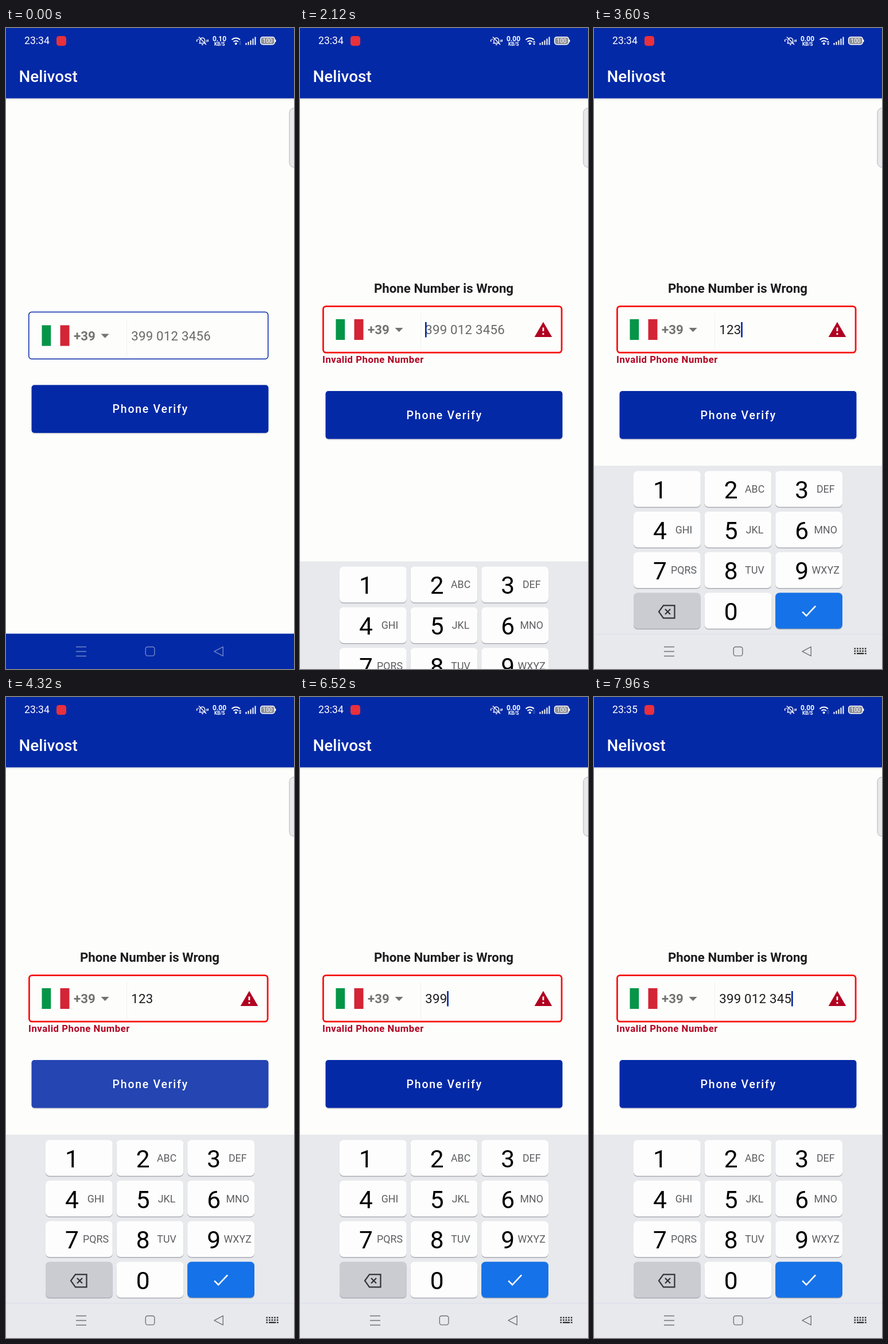
An HTML page that plays this animation: 502x1116 px, repeating every 8 s.

```html
<!DOCTYPE html>
<html lang="en">
<head>
<meta charset="utf-8">
<title>Phone verification</title>
<style>
  html, body { margin: 0; width: 100%; height: 100%; overflow: hidden; background: #fdfdfc; }
  svg { display: block; width: 502px; height: 1116px; font-family: Roboto, sans-serif; }
  .mid { text-anchor: middle; }
  .bold { font-weight: 700; }
  .medium { font-weight: 500; }
  .line { fill: none; stroke-width: 1.4; }
</style>
</head>
<body>
<svg viewBox="0 0 502 1116">
  <defs>
    <clipPath id="buttonClip"><rect x="44.5" y="621.5" width="413" height="83.5" rx="5"/></clipPath>
    <linearGradient id="shade" x2="0" y2="1">
      <stop stop-color="#000" stop-opacity=".12"/><stop offset="1" stop-color="#000" stop-opacity="0"/>
    </linearGradient>
    <g id="navIcons" class="line">
      <path d="M122 1077.5h18M122 1085.5h18M122 1093.5h18"/>
      <rect x="243.3" y="1077.5" width="15.6" height="15.6" rx="3.5"/>
      <path d="M363 1085.3L378.3 1077.3V1093.3Z" stroke-linejoin="round"/>
    </g>
  </defs>

  <rect width="502" height="1116" fill="#fdfdfc"/>
  <rect y="122.5" width="502" height="4" fill="url(#shade)"/>
  <rect width="502" height="122.5" fill="#0329a6"/>
  <text class="medium" x="22.5" y="93.5" font-size="27.9" fill="#fff">Nelivost</text>

  <g fill="#fff">
    <text id="clock" x="32" y="28.3" font-size="17.6"></text>
    <rect x="88" y="14" width="17" height="17" rx="4.5" fill="#e9303c"/>
    <path class="line" stroke="#fff" d="M336.5 26.5h11.500M338 26v-4.500a4.300 4.300 0 0 1 8.600 0V26M341 29h2.800M336 15.500L349 29M332.700 20v4M335 18.800v2M350 20.500v4M352.300 20v4"/>
    <text id="speed" class="mid bold" x="372" y="22.6" font-size="12"></text>
    <text class="mid bold" x="372.3" y="30.5" font-size="8.2">KB/S</text>
    <path d="M393.500 20.500a10 10 0 0 1 14.400 0M396.500 24a6 6 0 0 1 8.400 0" fill="none" stroke="#fff" stroke-width="2"/>
    <circle cx="400.7" cy="27.3" r="2"/>
    <path id="wifiArrows" d="M405.800 25.300l2.300-3 2.300 3zM405.800 26.800l2.300 3 2.300-3z"/>
    <path d="M418.500 29.500v-3.500M422.500 29.500v-5.500M426.500 29.500v-8M430.500 29.500v-11M434.500 29.500v-14" stroke="#fff" stroke-width="2"/>
    <rect x="443.7" y="15.7" width="24.6" height="13" rx="4" fill="#8d9098" stroke="#fff" stroke-width="1.5"/>
    <rect x="469" y="20" width="1.5" height="4.5" rx=".7"/>
    <text class="mid" x="456" y="25.8" font-size="10">100</text>
  </g>

  <rect x="494" y="139.5" width="20" height="103" rx="8" fill="#e8e9ea" stroke="#b3b5bf"/>

  <g id="errors">
    <text class="mid bold" x="250.5" y="461" font-size="22.3" fill="#1c1c1e">Phone Number is Wrong</text>
    <text class="bold" x="39" y="583" font-size="16.73" letter-spacing=".53" fill="#b00020">Invalid Phone Number</text>
    <path d="M424 511.700l15.300 26.300h-30.600z" fill="#b00020"/>
    <path d="M422.600 521.500h2.800v6.500h-2.800zM422.600 531h2.800v3h-2.800z" fill="#fff"/>
  </g>

  <g id="field">
    <rect id="border" rx="5" fill="none"/>
    <path d="M210.500 507v66" stroke="#f1f1f4"/>
    <path d="M62.500 517.500h16v36h-16z" fill="#059547"/>
    <path d="M78.500 517.500h16v36h-16z" fill="#fff"/>
    <path d="M94.500 517.500h16v36h-16z" fill="#d32536"/>
    <text class="bold" x="118" y="543.5" font-size="22.3" fill="#737370">+39</text>
    <path d="M165.500 532.500h14.200l-7.100 7.200z" fill="#74746f"/>
    <text id="number" x="218.2" y="543.5" font-size="22.3" letter-spacing=".2"></text>
    <rect id="cursor" y="522.5" width="2.7" height="26.5" fill="#0329a6"/>
  </g>

  <g id="button">
    <rect x="45" y="623.5" width="412" height="83.5" rx="5" fill="#000" opacity=".13"/>
    <rect x="44.5" y="621.5" width="413" height="83.5" rx="5" fill="#0329a6"/>
    <g clip-path="url(#buttonClip)"><circle id="ripple" cy="663.5" fill="#fff"/></g>
    <text class="mid medium" x="251.8" y="670.3" font-size="19.5" letter-spacing="1.74" fill="#fff">Phone Verify</text>
  </g>

  <rect y="1054.5" width="502" height="61.5" fill="#0329a6"/>
  <use href="#navIcons" stroke="#7389cb"/>

  <g id="keyboard">
    <rect y="762" width="502" height="354" fill="#e7e9ec"/>
    <g id="keys"></g>
    <path d="M0 1055.500h502" stroke="#d9deea"/>
    <use id="darkNav" href="#navIcons"/>
    <g id="imeIcon" fill="none" stroke-width="2.4">
      <path d="M453.500 1080.500h21M453.500 1084.700h21" stroke-dasharray="2.6 2"/>
      <path d="M453.500 1089h2.600M458 1089h12.500M472.200 1089h2.600"/>
    </g>
  </g>
</svg>

<script>
const LOOP = 8000, FOCUS = 2040, ERROR = 1360;
const el = id => document.getElementById(id);
const clamp = v => Math.max(0, Math.min(1, v));
const progress = (t, from, to) => clamp((t - from) / (to - from));
const easeOut = p => 1 - (1 - p) ** 3;
const set = (id, attrs) => {
  for (const name in attrs) el(id).setAttribute(name, attrs[name]);
};

const labels = ['', 'ABC', 'DEF', 'GHI', 'JKL', 'MNO', 'PQRS', 'TUV', 'WXYZ'];
const layout = '123456789<0>';
const keyColor = { '<': '#cbccd2', '>': '#1672e8' };
const fillOf = key => keyColor[key] || '#fdfdfd';

el('keys').innerHTML = [...layout].map((key, i) => {
  const x = 69 + i % 3 * 123.6, y = 771.2 + Math.floor(i / 3) * 70.7;
  const box = (dy, attrs) => `<rect x="${x}" y="${y + dy}" width="116.8" height="62.5" rx="7" ${attrs}/>`;
  const base = box(1.5, 'fill="#a9abb3"') + box(0, `id="key${i}" fill="${fillOf(key)}"`);
  if (key === '<') return base + `<path transform="translate(${x + 43} ${y + 21})" fill="none" stroke="#303236"
    stroke-width="2.2" d="M9 1H28.500V23H9L1 12ZM12 7.500l9 9m0-9l-9 9"/>`;
  if (key === '>') return base + `<path d="M${x + 47} ${y + 33}l7 7 16-17" fill="none" stroke="#fff" stroke-width="2.6"/>`;
  return base + `<text class="mid" x="${x + 46}" y="${y + 47.6}" font-size="42.5">${key}</text>
    <text class="mid" x="${x + 87.5}" y="${y + 37.6}" font-size="17.8" fill="#5d5e61">${labels[i] || ''}</text>`;
}).join('');

// Each press: touch time, key. The edit lands a moment after the touch.
const EDIT_DELAY = 80, HOLD = 120;
const presses = [
  [2880, '1'], [3160, '2'], [3440, '3'],
  [4800, '<'], [4920, '<'], [5040, '<'],
  [5400, '3'], [5720, '9'], [6040, '9'],
  [6600, '0'], [6840, '1'], [7040, '2'],
  [7360, '3'], [7600, '4'], [7840, '5']
];

const format = d => [d.slice(0, 3), d.slice(3, 6), d.slice(6)].filter(Boolean).join(' ');

function drawInput(t) {
  let digits = '', lastEdit = FOCUS, held = '';
  for (const [down, key] of presses) {
    if (t >= down && t < down + HOLD) held = key;
    if (t < down + EDIT_DELAY) continue;
    digits = key === '<' ? digits.slice(0, -1) : digits + key;
    lastEdit = down + EDIT_DELAY;
  }
  [...layout].forEach((key, i) => {
    const pressed = key === '<' ? '#b9bbc1' : '#e2e4e2';
    set('key' + i, { fill: key === held ? pressed : fillOf(key) });
  });
  const number = el('number');
  number.textContent = digits ? format(digits) : '399 012 3456';
  set('number', { fill: digits ? '#1c1c1e' : '#686868' });
  const width = digits ? number.getComputedTextLength() : 0;
  const visible = t >= FOCUS && (t - lastEdit) % 1000 < 500;
  set('cursor', { x: 218 + width, opacity: +visible });
}

function drawRipple(t) {
  const [start, fade, end] = t < 3000 ? [ERROR, 1480, 1720] : [4080, 4240, 4560];
  const grow = progress(t, start, start + 140);
  set('ripple', {
    cx: 340 - 89 * grow,
    r: 150 + 90 * grow,
    opacity: t < start ? 0 : .17 * (1 - progress(t, fade, end))
  });
}

// The outline grows inwards from a fixed outer edge.
function drawBorder(focused) {
  const w = focused ? 2.8 : 1.5;
  set('border', {
    x: 39 + w / 2, y: 493.7 + w / 2, width: 418.5 - w, height: 83.3 - w,
    stroke: focused ? '#f5120f' : '#0329a6', 'stroke-width': w
  });
}

function draw(t) {
  const failed = t >= ERROR, focused = t >= FOCUS;
  el('clock').textContent = t < 6800 ? '23:34' : '23:35';
  el('speed').textContent = t < 440 ? '0.10' : '0.00';
  set('wifiArrows', { opacity: focused && t < 6240 ? 1 : .25 });
  set('errors', { opacity: +failed });
  set('field', { transform: `translate(0 ${failed ? -10.5 : 0})` });
  set('button', { transform: `translate(0 ${failed ? 10.5 : 0})` });
  drawBorder(focused);

  const rise = easeOut(progress(t, FOCUS, 2400));
  set('keyboard', { transform: `translate(0 ${354 * (1 - rise)})`, opacity: +focused });
  const dark = progress(t, 2880, 3200);
  const gray = to => `rgb(${[221, 223, 226].map(c => Math.round(c + (to - c) * dark))})`;
  set('darkNav', { stroke: gray(114) });
  set('imeIcon', { stroke: gray(52) });

  drawInput(t);
  drawRipple(t);
}

function tick() {
  const t = performance.now() % LOOP;
  draw(Math.floor(t / 40) * 40);
  requestAnimationFrame(tick);
}
tick();
</script>
</body>
</html>
```
